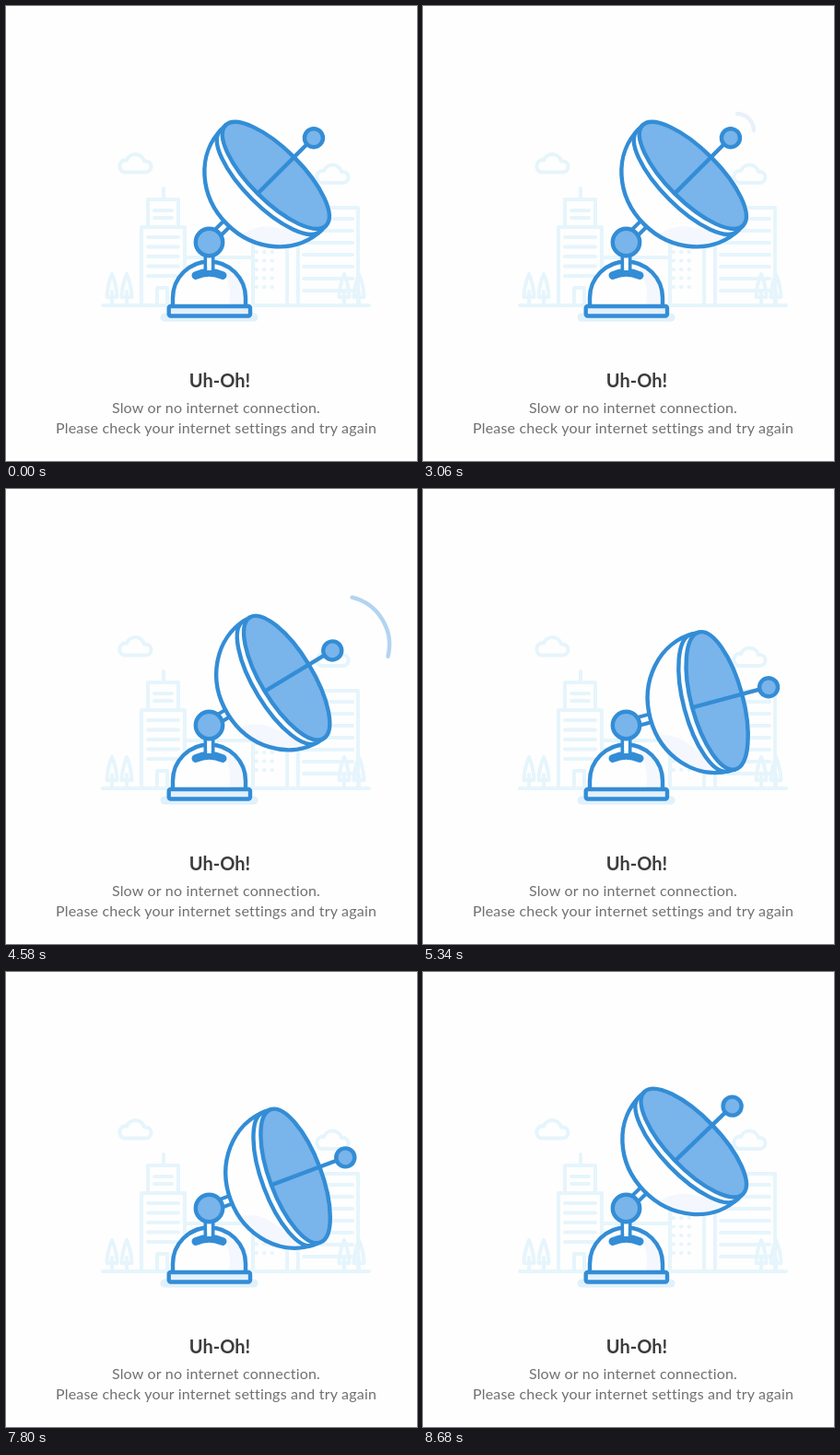
Animation, 446 px wide and 494 px high, one loop 8700 ms. Source, as an HTML page:

```html
<!DOCTYPE html>
<html lang="en">
<head>
<meta charset="utf-8">
<title>No connection</title>
<style>
  html, body { margin: 0; width: 100%; height: 100%; overflow: hidden; background: #fefefe; }
  svg { display: block; width: 446px; height: 494px; }
  text { font-family: Lato, "Open Sans", sans-serif; text-anchor: middle; }
  .title { font-size: 20px; font-weight: 700; fill: #3c3c3c; }
  .note { font-size: 16px; letter-spacing: .2px; fill: #707070; }
  .city { fill: none; stroke: #e6f5fc; stroke-width: 4; stroke-linecap: round; stroke-linejoin: round; }
  .line { stroke: #338dd6; stroke-width: 4.4; stroke-linecap: round; stroke-linejoin: round; }
  .white { fill: #fefefe; }
  .blue { fill: #79b4ea; }
  .none { fill: none; }
  .shade { fill: #f4f7fd; }
</style>
</head>
<body>
<svg viewBox="0 0 446 494">
  <g class="city">
    <path id="lines"/>
    <path d="M105 325H394"/>
    <path d="M147 325V240H194V325M154 240V210H187V240M171 209V198M161 222H180M161 230H180M164 325V306H175V325"/>
    <path d="M194 273H268V325M268 273V256H305V325M317 325V219H382V325"/>
    <path id="trees"/>
    <path id="clouds"/>
    <path id="windows"/>
  </g>

  <path d="M172 338H269" stroke="#e0f1fb" stroke-width="9" stroke-linecap="round"/>
  <path class="white" d="M181 326V317A39.500 39.500 0 0 1 260 317V326Z"/>
  <path class="shade" d="M238 283Q260 294 260 325H242Q246 300 232 280Z"/>
  <path class="line none" d="M181 326V317A39.500 39.500 0 0 1 260 317V326"/>
  <rect class="line" x="176.700" y="326" width="88.300" height="10.500" rx="2" fill="#e3f0fb"/>
  <path class="line none" d="M206 292.500Q220.500 286 235 292.500" style="stroke-width:9"/>
  <path class="line white" d="M216.500 268V286H224.500V268" style="stroke-width:4"/>
  <path d="M220.500 270V287" stroke="#fefefe" stroke-width="4.500"/>

  <g id="dish">
    <path class="line white" d="M8 -4.500H36V4.500H8" style="stroke-width:4"/>
    <path class="white" d="M96 -76.500A68.500 77 0 0 0 96 77.500Z"/>
    <path class="shade" d="M31 20Q52 24 62 40Q76 62 96 77.500A68.500 77 0 0 1 31 20Z"/>
    <path class="line none" d="M96 -76.500A68.500 77 0 0 0 96 77.500"/>
    <path class="line white" d="M102.500 -76.500H94A28 77 0 0 0 94 77.500H102.500"/>
    <ellipse class="line blue" cx="102.500" cy="0.500" rx="28" ry="77"/>
    <path class="line" d="M75 0.500H150"/>
    <circle class="line blue" cx="160.300" cy="0.800" r="10"/>
    <path id="wave" class="line none"/>
  </g>

  <circle class="line blue" cx="220.500" cy="256.500" r="14.700"/>

  <text class="title" x="232" y="413.500">Uh-Oh!</text>
  <text class="note" x="228" y="442">Slow or no internet connection.</text>
  <text class="note" x="228" y="464">Please check your internet settings and try again</text>
</svg>
<script>
  const LOOP = 8700;
  const PIVOT = { x: 220, y: 256 };
  const HIGH = 45, LOW = 15;
  const ANCHOR = 110;
  const SWING = { down: 3880, up: 7380, length: 1480 };
  const GROW = 760, FADE = 220;
  const WAVES = [[360, 1230], [1720, 2580], [3050, 4470]];

  const $ = id => document.getElementById(id);
  const clamp = v => Math.min(1, Math.max(0, v));
  const ease = v => (1 - Math.cos(Math.PI * clamp(v))) / 2;
  const mix = (a, b, k) => a + (b - a) * k;
  const rad = deg => deg * Math.PI / 180;
  const row = (count, make) => Array.from({ length: count }, (_, i) => make(i)).join('');

  function drawCity() {
    $('lines').setAttribute('d',
      row(5, i => `M154 ${251 + i * 10.5}H187`) + row(7, i => `M323 ${231 + i * 13}H376`));
    $('windows').setAttribute('d',
      row(15, i => `M${271.5 + i % 3 * 8.5} ${267 + Math.floor(i / 3) * 9.5}h.5`));
    $('trees').setAttribute('d', [115, 131, 367, 383].map(x =>
      `M${x} 291Q${x - 5} 303 ${x - 5.5} 316H${x + 5.5}Q${x + 5} 303 ${x} 291M${x} 310V325`).join(''));
    $('clouds').setAttribute('d', [[122, 180.5], [336, 192]].map(([x, y]) =>
      `M${x + 6} ${y}H${x + 29}a6 6 0 0 0 1 -12h-2a10 10 0 0 0 -19 -1a6 6.500 0 0 0 -3 13`).join(''));
  }

  // The anchor slides along a chord while the dish turns around it.
  function placeDish(t) {
    const p = ease((t - SWING.down) / SWING.length) - ease((t - SWING.up) / SWING.length);
    const along = trig => ANCHOR * mix(trig(rad(HIGH)), trig(rad(LOW)), p);
    const x = PIVOT.x + along(Math.cos);
    const y = PIVOT.y - along(Math.sin);
    $('dish').setAttribute('transform',
      `translate(${x} ${y}) rotate(${-mix(HIGH, LOW, p)}) translate(${-ANCHOR} 0)`);
  }

  function drawWave(t) {
    const active = WAVES.find(([start, fade]) => t >= start && t < fade + FADE);
    $('wave').style.display = active ? '' : 'none';
    if (!active) return;
    const [start, fade] = active;
    const growth = clamp((t - start) / GROW);
    const r = mix(18, 53, ease(growth));
    const d = r * Math.SQRT1_2;
    $('wave').setAttribute('d', `M${171 + d} ${-d}A${r} ${r} 0 0 1 ${171 + d} ${d}`);
    $('wave').style.opacity = mix(.1, .75, growth) * (1 - clamp((t - fade) / FADE));
  }

  function render(now) {
    const t = now % LOOP;
    placeDish(t);
    drawWave(t);
  }

  const begin = performance.now();
  function tick() {
    render(performance.now() - begin);
    requestAnimationFrame(tick);
  }

  drawCity();
  tick();
</script>
</body>
</html>
```
